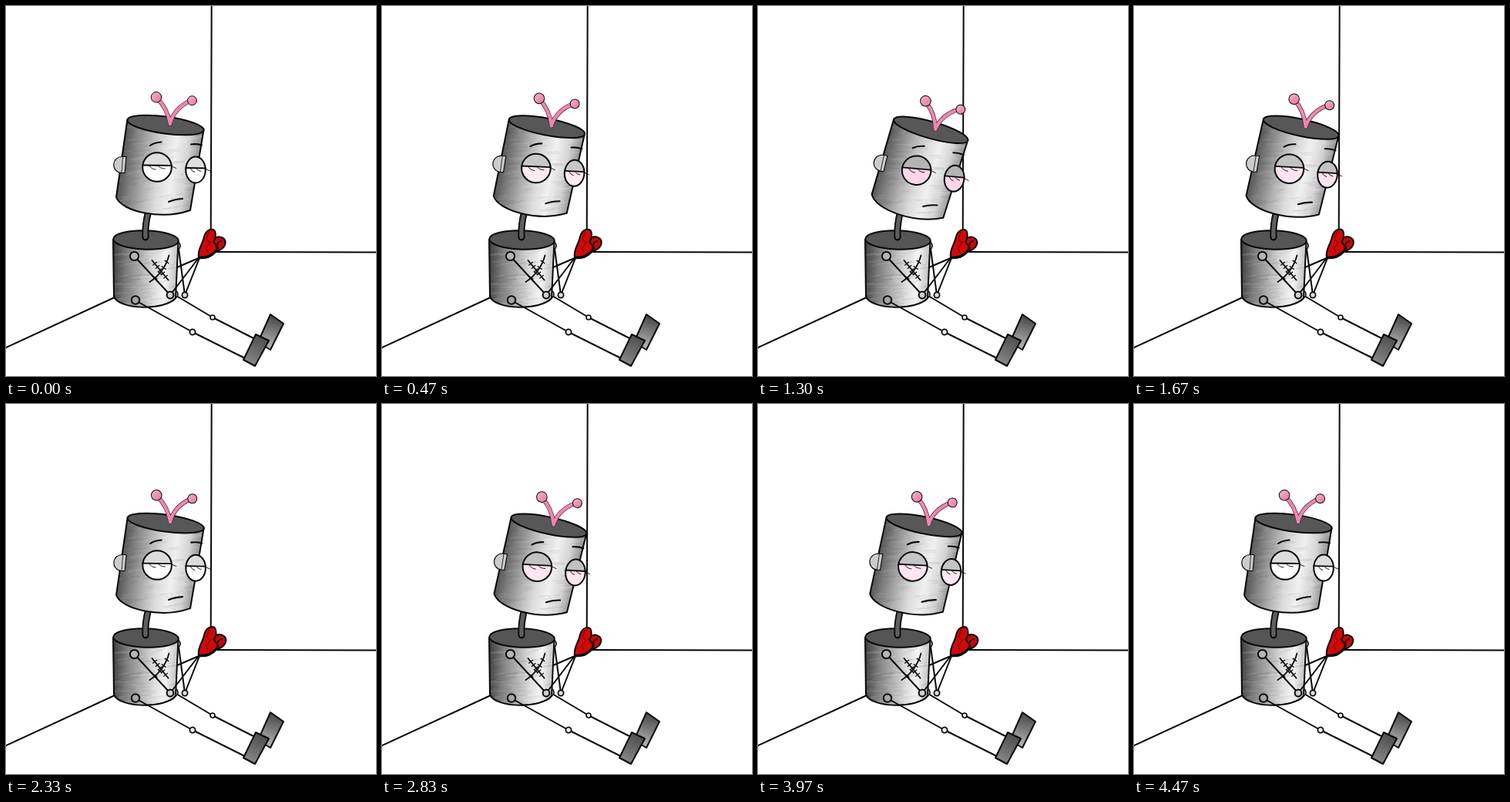
An HTML page with a canvas that plays this animation: 480 px wide and 480 px high, repeating every 4510 ms.

```html
<!DOCTYPE html>
<html>
<head>
<meta charset="utf-8">
<style>
  html, body { margin: 0; overflow: hidden; background: #fff; }
  canvas { display: block; }
</style>
</head>
<body>
<canvas id="stage" width="480" height="480"></canvas>
<script>
const ctx = document.getElementById('stage').getContext('2d');
const LOOP = 4510, SWAY = LOOP / 2, TILT = 8.6 * Math.PI / 180;
const mix = (a, b, k) => Math.round(a + (b - a) * k);

function shape(d, fill, width = 2, stroke = '#080808') {
  const p = new Path2D(d);
  if (fill) { ctx.fillStyle = fill; ctx.fill(p); }
  if (width) { ctx.lineWidth = width; ctx.strokeStyle = stroke; ctx.stroke(p); }
}

function oval(x, y, rx, ry, fill, width = 2, turn = 0) {
  ctx.beginPath();
  ctx.ellipse(x, y, rx, ry, turn, 0, 7);
  ctx.fillStyle = fill;
  ctx.fill();
  ctx.lineWidth = width;
  ctx.strokeStyle = '#080808';
  ctx.stroke();
}

function ramp(x0, y0, x1, y1, ...colors) {
  const g = ctx.createLinearGradient(x0, y0, x1, y1);
  colors.forEach((c, i) => g.addColorStop(i / (colors.length - 1), c));
  return g;
}

function turned(x, y, angle, draw, scale = 1) {
  ctx.save();
  ctx.translate(x, y);
  ctx.rotate(angle);
  ctx.scale(scale, scale);
  ctx.translate(-x, -y);
  draw();
  ctx.restore();
}

// Cylinder wall with faint brushed streaks
function metal(d, fill, x, y, w, h, seed) {
  shape(d, fill, 0);
  ctx.save();
  ctx.clip(new Path2D(d));
  const rnd = () => (seed = seed * 16807 % 2147483647) / 2147483647;
  ctx.lineWidth = 2;
  for (let i = 0; i < 130; i++) {
    const sx = x + rnd() * w, sy = y + rnd() * h, len = 6 + rnd() * 16;
    ctx.strokeStyle = rnd() < 0.5 ? 'rgba(0,0,0,.05)' : 'rgba(255,255,255,.08)';
    ctx.beginPath();
    ctx.moveTo(sx, sy);
    ctx.lineTo(sx + len, sy - 2);
    ctx.stroke();
  }
  ctx.restore();
  shape(d);
}

function stitches(x0, y0, x1, y1, bend, count) {
  const dx = x1 - x0, dy = y1 - y0, len = Math.hypot(dx, dy);
  const nx = -dy / len, ny = dx / len;
  const [cx, cy] = [(x0 + x1) / 2 + nx * bend * 2, (y0 + y1) / 2 + ny * bend * 2];
  shape(`M${x0} ${y0}Q${cx} ${cy} ${x1} ${y1}`, null, 1.8);
  for (let i = 1; i <= count; i++) {
    const k = i / (count + 1), off = bend * 4 * k * (1 - k);
    const x = x0 + dx * k + nx * off, y = y0 + dy * k + ny * off;
    shape(`M${x - nx * 3} ${y - ny * 3}L${x + nx * 3} ${y + ny * 3}`, null, 1.3);
  }
}

function room() {
  shape('M266.7 0L265.7 293M272 319L480 319.4M0 443L142 377.5');
}

function farLeg() {
  shape('M221 376L268 404L325 433');
  oval(268, 404, 3, 3, '#eee', 1.6);
  shape('M343 400L360 412L343 446L327 436Z', ramp(350, 402, 338, 442, '#454545', '#7c7c7c', '#b4b4b4'));
}

function nearLeg() {
  shape('M168 382L242 423L318 461');
  oval(242, 423, 3.6, 3.6, '#eee', 1.8);
  shape('M324 426L341 434L323 467L308 459Z', ramp(333, 428, 314, 464, '#4c4c4c', '#6a6a6a', '#888'));
  oval(168, 381.5, 5.2, 5.2, '#a5a5a5');
}

function torso() {
  oval(222, 311, 4, 5, '#ccc', 1.6);
  oval(219, 374, 4, 4.5, '#ccc', 1.6);
  metal('M139 303L140 377C148 395 206 395 220 379L223.5 305Z',
    ramp(139, 340, 223, 344, '#444', '#7c7c7c', '#aaa', '#d6d6d6', '#f4f4f4', '#c0c0c0'), 130, 295, 92, 98, 77);
  oval(181.5, 303.5, 42.3, 12.2, '#555', 2, 0.03);
  shape('M181 300Q180 284 185 266', null, 9);
  shape('M181 299.5Q180 284 185 266', null, 5.4, '#5e5e5e');
  stitches(211.5, 323.5, 186.5, 358, -4, 4);
  stitches(189.5, 330, 210.5, 355.5, 0, 5);
}

function arms() {
  shape('M224 315L232 375L251 327M222 339L250 327M166 324L213 375L249 328');
  oval(166.5, 324.5, 5.6, 5.6, '#b5b5b5');
  oval(213, 375, 4.4, 4.4, '#ccc');
  oval(232, 375, 3.6, 3.6, '#ddd', 1.8);
}

function heart(pulse) {
  turned(250, 326, 0.02 * pulse, () => {
    shape('M268 303C276 296 286 301 284 309C282 316 275 317 268 321Z', '#c40808');
    shape('M250 326C248 316 255 310 257 299C260 289 269 288 271 293Q273 300 269 306L275 314Q271 318 268 322C263 327 255 327 250 326Z', '#d00909');
    shape('M251 326.5Q263 327 270 320', null, 3.4);
    shape('M263 293L260 303L265 307L259 314L262 319', null, 1, '#700');
    shape('M279 305Q273 306 273 315', null, 1.8, '#200');
  }, 1 + 0.07 * pulse);
}

function eye(x, y, rx, ry, tilt, mood) {
  const flush = mood ** 0.7, grey = mix(222, 178, flush);
  oval(x, y, rx, ry, `rgb(255,${mix(255, 212, flush)},${mix(255, 232, flush)})`, 0.1);
  ctx.save();
  ctx.clip();
  turned(x, y, -tilt / 2, () => {
    ctx.fillStyle = `rgb(${grey},${grey},${grey})`;
    ctx.fillRect(x - 22, y - 22, 44, 19.5);
  });
  ctx.restore();
  ctx.lineWidth = 2;
  ctx.stroke();
  turned(x, y, -tilt / 2, () => {
    shape(`M${x - rx} ${y - 2.5}L${x + rx} ${y - 2}`, null, 1.8);
    shape(`M${x + rx - 1} ${y - 1.5}l7 3M${x - rx * .55} ${y - 2}q3 5 ${rx * .45} 5M${x + rx * .05} ${y - 2}q3 4 ${rx * .5} 4`, null, 0.9);
  });
}

function antennae() {
  const stalks = 'M213 153Q209 132 196 120M213 152Q218 133 239 123';
  shape(stalks, null, 5.6, '#4a2836');
  shape(stalks, null, 4.2, '#ee86b0');
  for (const [x, y, r] of [[195, 118.3, 6.8], [241.5, 122.7, 6]]) {
    oval(x, y, r, r, ramp(x - r, y - r, x + r, y + r, '#f8b4cd', '#e0749f'), 1);
  }
}

function head(tilt, mood) {
  metal('M157.5 147L143 248C150 267 202 278 239 265L256.5 160.5Z',
    ramp(150, 196, 251, 210, '#555', '#868686', '#b2b2b2', '#dadada', '#f0f0f0', '#d4d4d4', '#888'), 138, 145, 122, 130, 31);
  oval(207, 154.5, 50, 11, '#575757', 2, 0.135);
  antennae();
  shape('M151 195.5A10.5 10.5 0 0 0 149.5 216.5L154 216.5L156 195.5Z', '#ccc', 1.1);
  shape('M151.5 196L150 216', null, 0.8);
  eye(196, 209, 18.8, 18.8, tilt, mood);
  eye(246, 212.5, 12.8, 17, tilt, mood);
  shape('M187 181Q193 177 201.5 176.5M240 179.5Q247 178.5 254 180.5M211 254Q219 250.5 229 250', null, 2.1);
}

function frame(now) {
  const t = now % LOOP, phase = t % SWAY;
  const mood = (1 - Math.cos(2 * Math.PI * phase / SWAY)) / 2;
  const beat = at => Math.exp(-(((phase - at) / 165) ** 2));
  const tilt = TILT * mood;
  ctx.fillStyle = '#fff';
  ctx.fillRect(0, 0, 480, 480);
  room();
  farLeg();
  torso();
  nearLeg();
  arms();
  heart(beat(240) + beat(1880));
  turned(171, 279, tilt, () => head(tilt, mood));
  requestAnimationFrame(() => frame(performance.now()));
}

ctx.lineCap = ctx.lineJoin = 'round';
frame(0);
</script>
</body>
</html>
```
